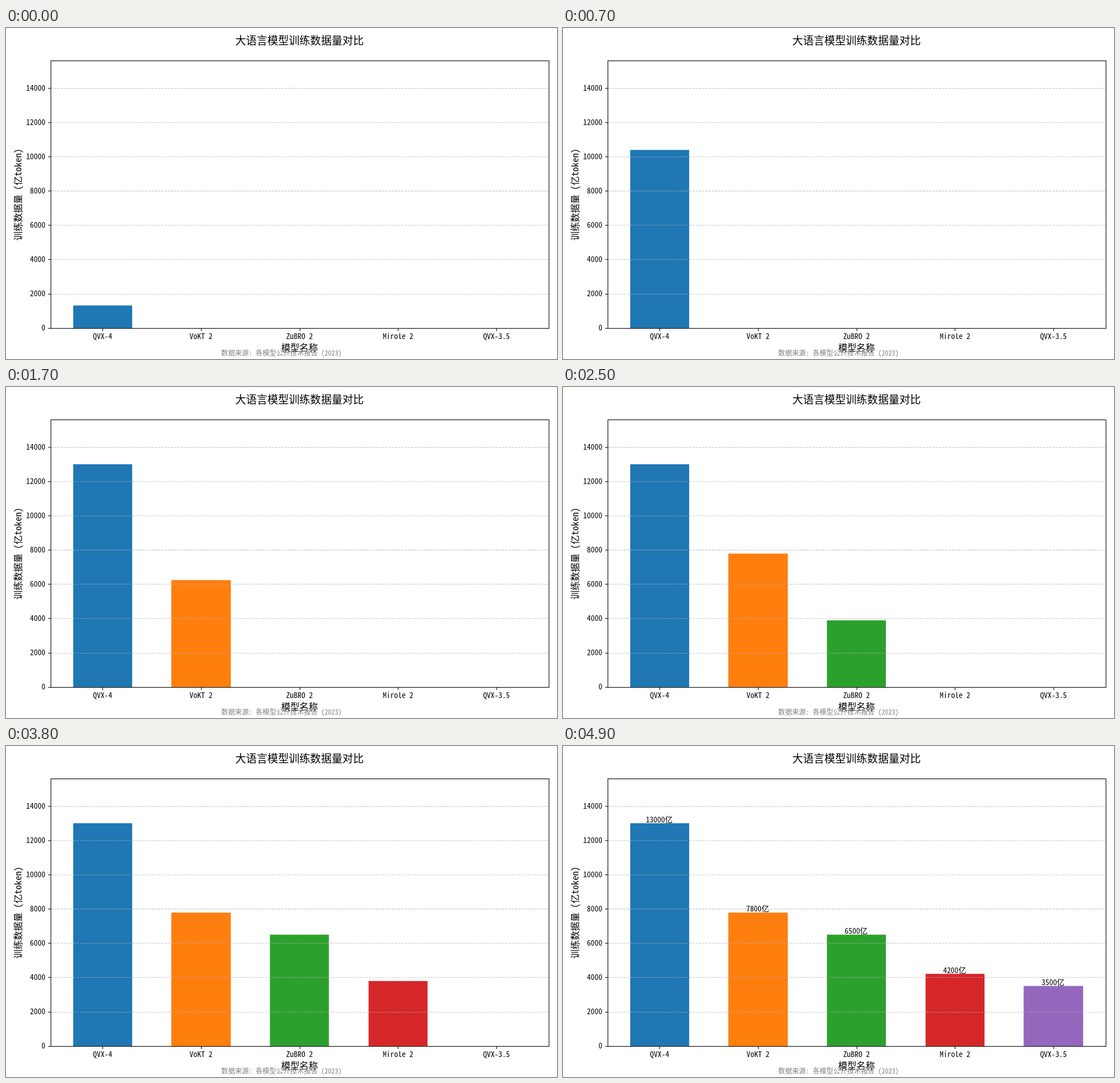
Animation of 966 by 580 pixels, one loop 5 s. Source, as an HTML page with a canvas:

```html
<!DOCTYPE html>
<html lang="zh-CN">
<head>
<meta charset="utf-8">
<style>
  html, body { margin: 0; width: 100%; height: 100%; overflow: hidden; background: #fff; }
  canvas { display: block; }
</style>
</head>
<body>
<canvas id="chart" width="966" height="580"></canvas>
<script>
const ctx = document.getElementById('chart').getContext('2d');
const FONT = '"Noto Sans Mono CJK SC", "Noto Sans CJK SC", "Noto Sans CJK", monospace';

// The chart is laid out on a 1000 x 600 figure at 100 dpi, then scaled to the stage.
const WIDTH = 1000, HEIGHT = 600;
const pt = n => n * 100 / 72;
const LEFT = 80.6, RIGHT = 984.8, TOP = 59.4, BASE = 543.6;
const MIDDLE = (LEFT + RIGHT) / 2;
const FIRST = 175.3, STEP = 178.7, BAR = 107.2;
const UNIT = 0.03103;         // figure pixels per value
const LINE = pt(0.8), TICK = pt(3.5);
const STEP_MS = 100, STEPS = 10;

const bars = [
  { name: 'QVX-4', value: 13000, color: '#1f77b4' },
  { name: 'VoKT 2', value: 7800, color: '#ff7f0e' },
  { name: 'ZuBRO 2', value: 6500, color: '#2ca02c' },
  { name: 'Mirole 2', value: 4200, color: '#d62728' },
  { name: 'QVX-3.5', value: 3500, color: '#9467bd' }
];
const total = bars.length * STEPS;

const centerX = i => FIRST + i * STEP;
const valueY = v => BASE - v * UNIT;
const snap = n => Math.round(n) + 0.5;

function text(str, x, y, size, align = 'center', color = '#000') {
  ctx.font = `${pt(size)}px ${FONT}`;
  ctx.textAlign = align;
  ctx.fillStyle = color;
  ctx.fillText(str, x, y);
}

function line(x1, y1, x2, y2) {
  ctx.beginPath();
  ctx.moveTo(x1, y1);
  ctx.lineTo(x2, y2);
  ctx.stroke();
}

function drawBar(bar, i, progress) {
  if (progress <= 0) return;
  const x1 = Math.round(centerX(i) - BAR / 2);
  const x2 = Math.round(centerX(i) + BAR / 2);
  const y = Math.round(valueY(bar.value * progress));
  ctx.fillStyle = bar.color;
  ctx.fillRect(x1, y, x2 - x1, Math.round(BASE) - y);
}

function drawGrid() {
  ctx.save();
  ctx.strokeStyle = 'rgba(176, 176, 176, 0.7)';
  ctx.setLineDash([3.7 * LINE, 1.6 * LINE]);
  for (let v = 2000; v <= 14000; v += 2000) {
    const y = snap(valueY(v));
    line(snap(LEFT), y, snap(RIGHT), y);
  }
  ctx.restore();
}

function drawAxes() {
  const left = snap(LEFT), top = snap(TOP), base = snap(BASE);
  ctx.strokeStyle = '#000';
  ctx.strokeRect(left, top, snap(RIGHT) - left, base - top);
  for (let v = 0; v <= 14000; v += 2000) {
    const y = snap(valueY(v));
    line(left - TICK, y, left, y);
    text(v, 71.3, valueY(v) + 5.1, 10, 'right');
  }
  bars.forEach((bar, i) => {
    const x = snap(centerX(i));
    line(x, base, x, base + TICK);
    text(bar.name, centerX(i), 564.3, 10);
  });
}

function drawTitles() {
  text('大语言模型训练数据量对比', MIDDLE, 30.5, 14);
  text('模型名称', MIDDLE, 585.5, 12);
  text('数据来源: 各模型公开技术报告 (2023)', WIDTH / 2, 594.3, 9, 'center', '#808080');
  ctx.save();
  ctx.translate(28, 302);
  ctx.rotate(-Math.PI / 2);
  text('训练数据量 (亿token)', 0, 0, 12);
  ctx.restore();
}

function draw(step) {
  ctx.fillStyle = '#fff';
  ctx.fillRect(0, 0, WIDTH, HEIGHT);
  bars.forEach((bar, i) => {
    drawBar(bar, i, Math.min(1, (step + 1 - i * STEPS) / STEPS));
  });
  drawGrid();
  drawAxes();
  drawTitles();
  if (step === total - 1) {
    bars.forEach((bar, i) => {
      text(bar.value + '亿', centerX(i) - 0.7, valueY(bar.value) - 1.9, 10);
    });
  }
}

ctx.scale(966 / WIDTH, 580 / HEIGHT);
ctx.lineWidth = LINE;

const start = performance.now();
function tick() {
  const elapsed = Math.max(0, performance.now() - start);
  draw(Math.floor(elapsed / STEP_MS) % total);
  requestAnimationFrame(tick);
}
tick();
</script>
</body>
</html>
```
